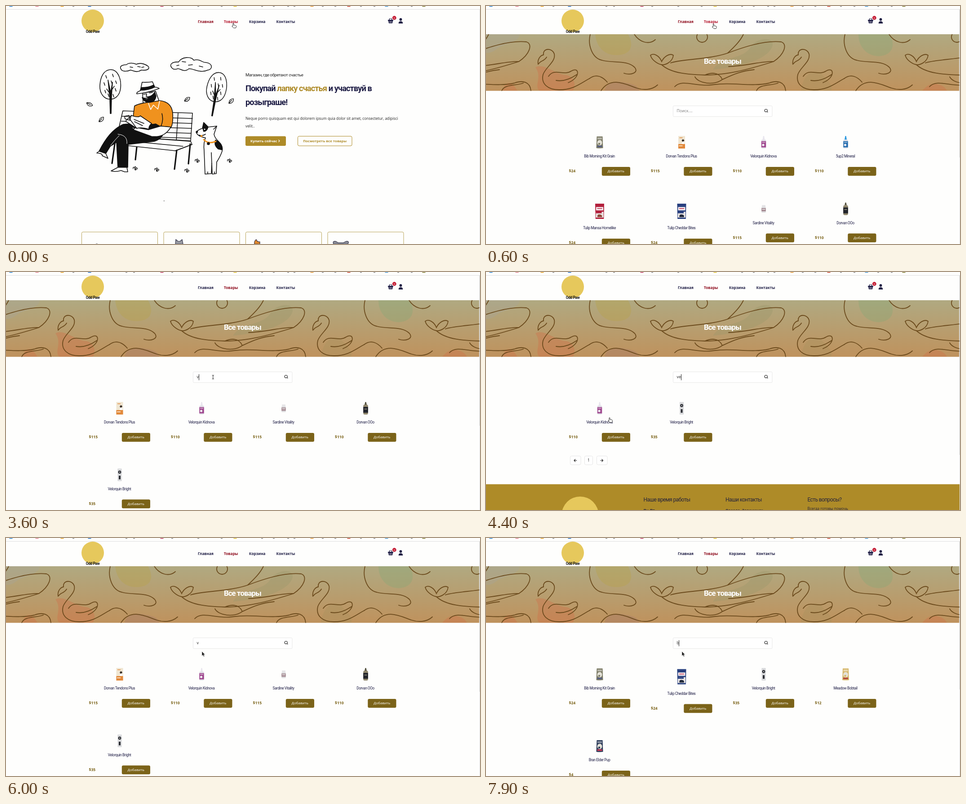
Write an HTML page that moves like this. It is 1055 px wide and 531 px high and loops after 8 s.

```html
<!DOCTYPE html>
<html lang="ru">
<head>
<meta charset="utf-8">
<title>Зоомагазин</title>
<style>
html, body { margin: 0; width: 100%; height: 100%; overflow: hidden; background: #fefefd; }
svg { display: block; width: 1055px; height: 531px; }
text { font-family: "Open Sans", "Noto Sans", sans-serif; white-space: pre; }
.hand { font-family: Roboto, "Liberation Sans", sans-serif; letter-spacing: -.05em; }
.ink { fill: none; stroke: #111; stroke-width: 1.6; stroke-linecap: round; stroke-linejoin: round; }
.paper { fill: #fefefd; }
.black { fill: #111; }
.orange { fill: #f0921e; }
</style>
</head>
<body>
<svg id="stage" viewBox="0 0 1055 531"></svg>
<script>
const NAVY = '#1d1c44', GOLD = '#ae8b28', BROWN = '#7b6319', LOGO = '#e6c85c';
const COLS = [252.5, 435, 617.5, 800];

const text = (x, y, s, size, fill = NAVY, extra = '') =>
  `<text x="${x}" y="${y}" font-size="${size}" fill="${fill}" ${extra}>${s}</text>`;
const rect = (x, y, w, h, fill, extra = '') =>
  `<rect x="${x}" y="${y}" width="${w}" height="${h}" fill="${fill}" ${extra}/>`;
const circle = (x, y, r, fill, extra = '') =>
  `<circle cx="${x}" cy="${y}" r="${r}" fill="${fill}" ${extra}/>`;
const path = (d, extra = '') => `<path d="${d}" ${extra}/>`;
const ink = (d, cls = '') => path(d, `class="ink ${cls}"`);
const at = (x, y, s, more = '') => `<g transform="translate(${x} ${y}) ${more}">${s}</g>`;
const MID = 'text-anchor="middle"', BOLD = 'font-weight="700"', HAND = 'class="hand"';

// name, price, shape, main colour, accent
const PRODUCTS = [
  ['Bib Morning Kit Grain', 24, 'bag', '#7d7c66', '#565e80'],
  ['Dorvan Tendons Plus', 115, 'box', '#f0e6d2', '#e28a3c'],
  ['Velorquin Kidnova', 110, 'dropper', '#a04a90', '#e9e6ee'],
  ['5up2 Mineral', 110, 'dropper', '#2a70b0', '#2f9be0'],
  ['Tulip Mansa Homelike', 24, 'sack', '#b3203c', '#8f4a38'],
  ['Tulip Cheddar Bites', 24, 'sack', '#28407f', '#222a3a'],
  ['Sardine Vitality', 115, 'jar', '#dcdcde', '#a58a92'],
  ['Dorvan OOo', 110, 'flask', '#8f866c', '#22242b'],
  ['Velorquin Bright', 35, 'tube', '#dadbdd', '#2b2d33'],
  ['Meadow Bobtail', 12, 'bag', '#d6b76a', '#b5483c'],
  ['Bran Elder Pup', 4, 'bag', '#2b3a58', '#c83a58'],
];

const SHAPES = {
  bag: (c, a) => path('M-6.5-13H6.5L7.5 13Q0 14-7.5 13Z', `fill="${c}"`) + rect(-5, -10.5, 10, 4, '#fff', 'opacity=".45"') +
    `<ellipse cx="0" cy="1" rx="5.5" ry="6" fill="#e4e2d8"/>` + circle(-1, 3.5, 2.3, c) + rect(-5.5, 7.5, 11, 3.5, a),
  box: (c, a) => rect(-7.5, -14, 15, 28, c) + rect(-7.5, 4, 15, 10, a) + circle(3, -4, 2.6, '#3a3028') +
    path('M0 4Q1-3 6-2V4Z', 'fill="#fff"') + rect(-5, -11, 7, 2, '#e5a468') + rect(-6, 7, 8, 2, '#f6dcc0'),
  dropper: (c, a) => path('M-1-14H1L2.5-6H-2.5Z', `fill="${a}"`) + rect(-5.2, -6, 10.4, 20, '#e4e4ea', 'rx="2"') +
    rect(-5.2, -2.5, 10.4, 14, c) + circle(-1, 6, 2.6, '#f1eef3') + rect(-3.5, -.5, 7, 1.5, '#fff', 'opacity=".6"'),
  sack: (c, a) => path('M-10-17H10L9.3 17H-9.3Z', `fill="${c}"`) + rect(-8, -9.5, 16, 7.5, '#f5eef0') +
    rect(-5.5, -7, 11, 2, '#c8506a') + rect(-8.5, 1, 17, 13, '#e9e5e4') + rect(-8.5, 1, 13, 3.5, c) +
    path('M-5 13Q-6 6 0 7Q7 8 5 13Z', `fill="${a}"`),
  jar: (c, a) => rect(-4, -8.5, 8, 4, '#e6e6e8', 'rx="1"') + rect(-4.8, -4.5, 9.6, 13, c, 'rx="1.5"') +
    rect(-4.8, -1.5, 9.6, 7, a) + rect(-3.5, .5, 7, 1.5, '#eee'),
  flask: (c, a) => path('M-1-14H1L2.5-8H-2.5Z', 'fill="#55523f"') + rect(-5.3, -8, 10.6, 22, c, 'rx="3"') +
    rect(-5.3, -3, 10.6, 13, a) + rect(-3, 1, 6, 1.4, '#a9a38c'),
  tube: (c, a) => rect(-4.7, -14, 9.4, 28, c, 'rx="1"') + circle(0, -6, 3.4, a) + rect(-2, 2, 4, 8, a) + rect(-1, -7, 2, 2, '#ddd'),
};

function header(home, hover) {
  const nav = [['Главная', 427], ['Товары', 485], ['Корзина', 541], ['Контакты', 601.5]];
  const tint = i => i == 1 && hover ? '#b5182f' : i == (home ? 0 : 1) ? '#8e0b1c' : NAVY;
  const marks = [[11, '#3b8fd8'], [69, '#e58c9c'], [125, '#e8a52c'], [186, '#2f78c8'], [347, '#c4486a'], [510, '#e6c83c'],
    [681, '#e8a040'], [763, '#d0503c'], [847, '#58a0d8'], [930, '#8c8840']];
  const words = [150, 268, 285, 370, 428, 480, 570, 596, 628, 642, 705, 733, 790, 820, 873, 903];
  return marks.map(([x, c]) => rect(x - 3.5, 0, 7, 1.6, c)).join('') +
    words.map(x => rect(x - 2, 0, 4, 1.3, '#777')).join('') +
    rect(0, 7, 1055, 1, '#dedede') + circle(193, 33, 25, LOGO) +
    text(193, 59.5, 'Odd Paw', 8.4, '#111', `${MID} ${BOLD} ${HAND}`) +
    nav.map(([s, x], i) => text(x, 38, s, 8.2, tint(i), BOLD)).join('') +
    path('M850 31H862V33H861L860 38.5H852L851 33H850Z', `fill="${NAVY}"`) +
    path('M852.5 31L855 27.5M859.5 31L857 27.5', `stroke="${NAVY}" stroke-width="1.3"`) +
    path('M854 34V37M856 34V37M858 34V37', 'stroke="#fff" stroke-width=".8"') +
    circle(864.3, 26.5, 4.4, '#c41a32') + text(864.3, 28.7, '0', 6, '#fff', MID) +
    circle(878.5, 30, 2.9, NAVY) + path('M873.7 39Q873.7 34 878.5 34T883.3 39Z', `fill="${NAVY}"`);
}

function scene() {
  const cloud = 'M256 141C251 133 262 131 268 131C274 125 286 128 290 130C301 125 312 131 317 135C321 143 309 144 301 143C291 150 284 144 277 143C268 147 258 146 256 141Z';
  const crown = 'M0-33C18-34 25-10 23 8C21 27 9 33 0 33C-14 33-24 20-23 2C-22-16-15-32 0-33Z';
  const bark = [[-10, -20], [5, -23], [-14, -4], [12, -8], [-12, 13], [11, 9], [6, 22], [-5, 21], [2, -8]].map(([x, y]) => `M${x} ${y}l2 6`).join('');
  const tree = ink(crown) + ink(bark) + path('M-5-10L-1 30L0 65L2 65L3 25L5-5L1 18Z', 'class="ink black"') + ink('M-1 20L-8 10M2 14L9 4');
  const leaf = ink('M-6 6C-5-3 0-6 6-6C7 2 2 7-6 6L2-2');
  const tuft = ink('M-5 0Q-6-5-3-4T0 3Q-2-6 1-6T1 3Q3-4 6-2T1 4');
  const slats = [246, 257, 268, 279, 290].map((y, i) => `M${258 - i * 1.5} ${y}L${415 - i} ${y + 5}`).join('');
  const bench = ink('M260 234L415 239L411 301L247 290Z', 'paper') + ink(slats) +
    ink('M300 236L296 292M383 239L379 302') + ink('M247 290L411 302L414 309L377 323L247 309Z', 'paper') +
    ink('M248 299L394 313M377 323L414 309') +
    path('M243 301L236 351M380 322L375 364M410 308L406 352M291 315L288 343', 'class="ink" style="stroke-width:3.2"');
  const man =
    path('M333 262C356 270 357 293 330 302L272 309L271 360L249 360L246 304L232 313L221 331L207 324C222 295 238 274 261 264C287 260 306 268 333 262Z', 'class="ink black"') +
    path('M269 307Q271 288 249 286M282 272Q309 284 340 283M252 289Q242 299 233 311', 'class="ink" style="stroke:#fff;stroke-width:1"') +
    ink('M207 324L202 328Q216 329 214 334L227 340L222 329ZM249 360L234 368Q244 371 256 367L264 370L271 370L269 360Z', 'paper') +
    ink('M304 194L305 215L317 225L341 213L333 190Z', 'paper') +
    ink('M286 223C303 214 325 215 342 211C360 213 370 223 371 240C372 255 371 263 368 270L342 268L333 263C317 266 289 260 283 247Z', 'orange') +
    path('M317 217L322 231L328 221L338 230L342 212', 'class="ink" style="stroke:#fff"') + ink('M347 240Q351 254 345 268') +
    path('M303 204Q312 208 318 202Q326 201 331 192L334 201Q332 216 317 215Q306 214 303 204Z', 'class="ink black"') +
    ink('M308 207Q313 210 318 206', 'paper') + ink('M306 197L312 196M319 194L326 193M313 196L312 202L316 202') +
    ink('M291 196Q315 194 341 184Q337 181 331 181L326 169Q312 171 303 170L299 189Q290 192 291 196Z', 'paper') +
    path('M299 188Q317 188 331 181L329 176Q318 182 301 182Z', 'class="ink black"') +
    ink('M367 270C357 287 344 293 324 291L283 276L289 271L317 276L344 268Z', 'paper') +
    ink('M266 257L279 244Q295 250 299 245L324 262Q317 268 318 275Q301 270 291 273Z', 'paper') +
    ink('M279 244L276 253L291 273M285 253L307 262M286 258L304 267M264 246L274 244L276 255L265 252Z');
  const dog =
    ink('M423 281Q430 275 437 273L440 260L450 270L469 268L463 286Q464 294 474 303Q484 314 481 324Q477 336 469 348L468 374L459 375L458 351L457 374L443 375L441 323Q439 306 444 294Q426 291 423 281Z', 'paper') +
    path('M438 273L440 260L450 270Q447 280 440 280ZM472 302Q483 310 481 321L472 319Q462 310 466 299Z', 'class="ink black"') +
    circle(442, 275, 1.5, '#fff') + circle(425, 281, 2.4, '#111') +
    ink('M430 288Q437 291 444 286M462 275L469 268M457 327L458 352M449 370V374M464 370V374') +
    path('M440 298Q450 309 467 302', 'class="ink" style="stroke:#f0921e;stroke-width:3"') + circle(450.5, 307, 3.3, '#111') +
    circle(435, 290, 2.3, '#f0921e');
  return ink(cloud) + ink('M276 136l6 1M293 135l6 1M302 137l5-1') +
    ink('M370 139C361 130 371 124 384 125C391 113 412 112 418 121C433 117 436 127 445 126C461 128 460 142 449 143C432 151 417 139 407 140C396 150 386 138 382 140Q374 143 370 139Z') +
    ink('M392 124l8 1M406 132l9-1M430 134l8 2M380 133l5-1') +
    at(232, 175, tree) + at(469, 181, tree, 'rotate(10) scale(.94 1)') +
    [[186, 219, 70], [212, 253, 0], [403, 208, 10], [501, 212, 0]].map(([x, y, r]) => at(x, y, leaf, `rotate(${r}) scale(.85)`)).join('') +
    bench + man + dog +
    [[287, 363], [335, 366], [402, 368], [425, 346], [497, 346]].map(([x, y]) => at(x, y, tuft, 'scale(.8)')).join('');
}

function home() {
  const cards = [168.5, 351, 533.5, 716].map(x => rect(x, 504.2, 169, 60, 'none', 'rx="3" stroke="#b9a457"')).join('');
  const heads = circle(202, 533, 3, '#666') +
    path('M377 531L378 521L383 525H387L392 521L394 531Z', 'fill="#999aa3" stroke="#35364a" stroke-width="1.2"') +
    path('M553 531Q552 524 557 521Q559 527 565 526V531Z', 'fill="#e28a2e" stroke="#3a3040" stroke-width="1.2"') +
    path('M729 531Q726 524 734 525L739 528H751L757 525Q765 524 761 531Z', 'fill="#8c8d98" stroke="#35364a" stroke-width="1.2"');
  return scene() + rect(351, 434, 1.5, 1.5, '#444') +
    text(533, 156.5, 'Магазин, где обретают счастье', 9.7, '#222', HAND) +
    text(533, 190, `Покупай <tspan fill="${GOLD}">лапку счастья</tspan> и участвуй в`, 18.2, NAVY, `${HAND} ${BOLD}`) +
    text(533, 220.5, 'розыграше!', 18.2, NAVY, `${HAND} ${BOLD}`) +
    text(533, 254.3, 'Neque porro quisquam est qui dolorem ipsum quia dolor sit amet, consectetur, adipisci', 8.35, '#222') +
    text(533, 271, 'velit..', 8.35, '#222') +
    rect(533, 290.5, 90, 21.5, GOLD, 'rx="3"') + text(544, 303.8, 'Купить сейчас', 7.8, '#fff', BOLD) +
    path('M606.5 298.5L609 301L606.5 303.5', 'fill="none" stroke="#fff" stroke-width="1.2"') +
    rect(649.5, 290.5, 120.5, 21.5, 'none', `rx="3" stroke="${GOLD}"`) + text(709.7, 303.8, 'Посмотреть все товары', 7.8, GOLD, `${BOLD} ${MID}`) +
    cards + heads;
}

function banner() {
  const lines = [
    'M116 130C114 119 121 110 128 109C126 93 148 93 152 107C156 124 132 137 127 153C122 174 138 187 163 187C195 187 211 172 230 162',
    'M117 129C122 121 129 124 135 114M139 157C152 137 172 157 190 145C208 134 211 160 183 171M156 166Q177 170 202 153',
    'M232 63C226 87 236 116 258 121C283 128 314 120 331 137C341 149 322 155 307 150M230 162C245 150 260 158 270 170',
    'M256 189C278 155 314 176 335 183C350 188 369 188 382 176',
    'M366 110C373 104 386 111 391 124C396 113 409 104 417 110C415 126 398 132 391 131C385 130 370 123 366 110Z',
    'M391 131C412 151 455 153 487 154C535 154 580 143 640 124C664 108 672 85 657 80C618 76 570 93 538 105C500 119 430 119 411 127',
    'M487 154C510 145 521 153 526 164C507 178 473 173 465 158M526 164C548 154 566 145 597 142',
    'M640 124C617 122 579 134 540 135M330 63C341 80 362 88 377 75M538 105C553 91 566 78 573 63',
    'M420 180C436 162 470 181 502 176C550 169 590 181 630 172C649 165 665 169 667 189M602 189C608 174 635 178 650 172',
  ];
  const tile = lines.map(d => path(d)).join('') + circle(481, 69, 12, 'none');
  const blob = (d, c) => path(d, `fill="${c}" opacity=".36"`);
  return `<defs><linearGradient id="sand" x2="0" y2="1"><stop stop-color="#b0a981"/><stop offset="1" stop-color="#bf925d"/></linearGradient>
    <clipPath id="strip"><rect y="63" width="1053.5" height="126.5"/></clipPath></defs><g clip-path="url(#strip)">` +
    rect(0, 63, 1053.5, 126.5, 'url(#sand)') +
    blob('M0 63H75C75 82 38 84 24 96Q10 107 0 104Z', '#a6a398') +
    blob('M243 63C246 95 268 113 298 109C331 105 325 77 316 63Z', '#b8a047') +
    blob('M110 137C129 126 154 153 178 154C198 157 201 180 193 189H119C106 178 126 159 110 137Z', '#cf6d45') +
    blob('M264 189C268 166 293 167 309 171Q339 175 341 189Z', '#a27566') +
    blob('M36 189Q47 160 64 180L70 189Z', '#cf6d45') +
    blob('M505 142C525 110 573 121 590 90C603 71 640 67 638 87C631 119 566 137 505 142Z', '#98966a') +
    blob('M829 63C829 90 846 111 874 112C910 110 910 81 898 63Z', '#86a674') +
    blob('M701 189C704 157 726 139 744 148C755 163 775 175 768 189Z', '#a6905b') +
    blob('M971 189Q986 171 1003 174Q1020 177 1026 189Z', '#cf6d45') +
    `<g fill="none" stroke="#6b4a1c" stroke-width="1.8" stroke-linecap="round">${[-567, 0, 567].map(x => at(x, 0, tile)).join('')}</g></g>` +
    text(526.5, 129, 'Все товары', 16.6, '#fff', `${MID} ${HAND} ${BOLD}`);
}

function card([name, price, shape, color, accent], x, y) {
  const dy = shape == 'sack' ? 11.5 : 0;
  return at(x, y, at(.5, dy ? 309.5 : 304, SHAPES[shape](color, accent)) + at(0, dy,
    text(0, 338.3, name, 8.2, NAVY, `${MID} ${HAND}`) + text(-68, 371.3, '$' + price, 8.6, BROWN, BOLD) +
    rect(5.3, 359, 63.2, 19.8, BROWN, 'rx="3"') + text(36.8, 371, 'Добавить', 8, '#fff', MID)));
}

function footer(y) {
  const key = (x, w) => rect(x, y + .5, w, 19.5, '#fff', 'rx="3" stroke="#e6e6e6"');
  const arrow = (x, k) => at(x, y + 10.5, path('M-3 0H3M0-3L3 0L0 3', 'fill="none" stroke="#222" stroke-width="1.1"'), `scale(${k} 1)`);
  const info = [['Наше время работы', 'Пн-Пт', BOLD], ['Наши контакты', 'Ореада, Заречинск', BOLD], ['Есть вопросы?', 'Всегда готовы помочь', '']];
  return key(187.5, 23.5) + key(219.5, 18) + key(246.5, 23.5) + arrow(199, -1) + arrow(257.5, 1) +
    text(228.5, y + 13, '1', 8.5, '#222', MID) + rect(0, y + 63.5, 1054, 300, GOLD) + circle(209.5, y + 132, 41, LOGO) +
    info.map(([title, line, style], i) => text(350.5 + i * 182.5, y + 102, title, 12, '#26233a', HAND) +
      text(350.5 + i * 182.5, y + (i < 2 ? 125 : 121), line, 8.3, '#26233a', style)).join('');
}

function shop(query) {
  const found = PRODUCTS.filter(p => p[0].toLowerCase().includes(query));
  let y = 0, out = '';
  for (let i = 0; i < found.length; i += 4) {
    const row = found.slice(i, i + 4);
    out += row.map((p, k) => card(p, COLS[k], y)).join('');
    y += row.some(p => p[2] == 'sack') ? 160 : 148.5;
  }
  return BANNER + rect(416.5, 222.8, 220.5, 24, '#fff', 'rx="2" stroke="#e7e7e7"') +
    circle(623.2, 233.2, 3, 'none', 'stroke="#222" stroke-width="1.1"') + path('M625.4 235.4L627.4 237.4', 'stroke="#222" stroke-width="1.2"') +
    text(424.5, 237.3, query || 'Поиск....', 8.8, query ? '#222' : '#777') + out + footer(y + 261.5);
}

const CURSORS = {
  hand: path('M1.5 1Q3-.5 3.5 1.5V4.5L8 5.5Q9.5 6 9 8L8 11H3L-.5 7.5Q-1 6 1.5 7Z', 'fill="#fff" stroke="#222" stroke-width=".9"'),
  arrow: path('M0 0V10L2.3 8L4 11.5L5.7 10.7L4.1 7.3H7Z', 'fill="#222" stroke="#fff" stroke-width=".5"'),
  beam: path('M-2-4.5Q0-4.5 0-3Q0-4.5 2-4.5M0-3.5V3.5M-2 4.5Q0 4.5 0 3Q0 4.5 2 4.5', 'fill="none" stroke="#222" stroke-width="1"'),
};

// start time, x, y, pointer shape
const MOVES = [[0, 503.5, 38, 'hand'], [100, 504, 39.5, 'hand'], [700, 505, 52, 'hand'], [800, 503, 78, 'arrow'], [900, 496, 112, 'arrow'],
  [1000, 486, 149, 'arrow'], [1100, 475, 184, 'arrow'], [1200, 466, 213, 'beam'], [1300, 461, 236, 'beam'], [1400, 458, 246, 'arrow'],
  [1500, 460.5, 249.5, 'beam'], [1900, 460.8, 234.5, 'beam'], [4200, 418, 262, 'arrow'], [4300, 335, 304, 'hand'],
  [4400, 272.5, 324.5, 'hand'], [4500, 240, 360, 'arrow'], [4600, 224, 343, 'hand'], [4800, 266, 327, 'hand'],
  [4900, 350, 297, 'arrow'], [5000, 427, 280, 'arrow'], [5200, 403, 268, 'arrow'], [5300, 428, 256, 'arrow'], [5400, 436, 253, 'arrow']];
const TYPED = [[0, ''], [3600, 'v'], [3900, 've'], [6000, 'v'], [6100, ''], [7900, 'b']];
const CARET = [[0, 0], [2300, 1], [2600, 0], [3400, 1], [4500, 0], [5200, 1], [5700, 0], [6300, 1], [6900, 0], [7500, 1]];
const CARET_X = { '': 425.5, v: 429.5, b: 429.5, ve: 434.5 };
const current = (list, t) => list.findLast(item => item[0] <= t);

const BANNER = banner();
const stage = document.getElementById('stage');
stage.innerHTML = '<g></g><g></g>';
const [page, overlay] = stage.children;
let shown = '', pointed = '';

function draw(t) {
  const query = current(TYPED, t)[1], isHome = t < 600, hover = t < 800;
  const state = [query, isHome, hover, t < 700].join();
  if (state != shown) {
    shown = state;
    const thumb = isHome ? 0 : query == 've' ? 400 : query == 'v' ? 335 : 330;
    page.innerHTML = (isHome ? home() : shop(query)) + header(t < 700, hover) +
      rect(1054, 8, 1, 523, '#e2e2e2') + rect(1054, 8, 1, thumb, '#bdbdbd');
  }
  const [, x, y, kind] = current(MOVES, t), caret = current(CARET, t)[1];
  const mark = [x, y, kind, caret, query].join();
  if (mark != pointed) {
    pointed = mark;
    overlay.innerHTML = (caret ? rect(CARET_X[query] - .5, 228, 1, 13.5, '#222') : '') + at(x, y, CURSORS[kind]);
  }
}

function tick() {
  draw(performance.now() % 8000);
  requestAnimationFrame(tick);
}
tick();
</script>
</body>
</html>
```
